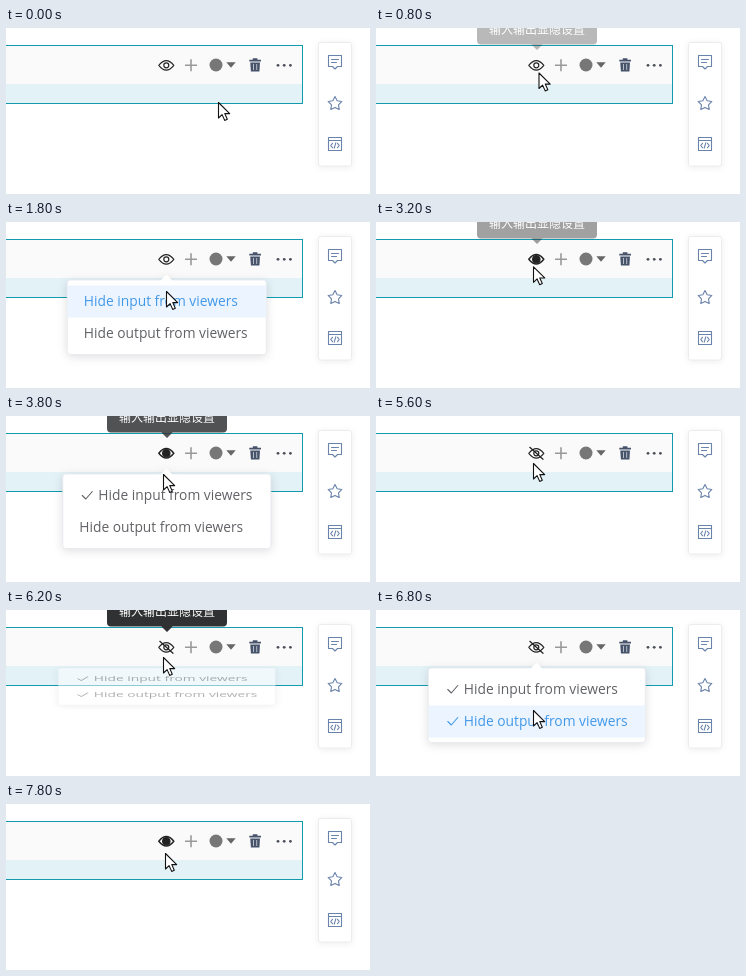
Recreate the animation shown at these times as an HTML page. Size 364 px wide and 166 px high, loop 8 s.

```html
<!DOCTYPE html>
<html lang="en">
<head>
<meta charset="utf-8">
<title>Cell visibility menu</title>
<style>
  html, body { margin: 0; width: 100%; height: 100%; overflow: hidden; background: #fff; }
  svg { display: block; width: 100%; height: 100%; }
  .line { fill: none; stroke-linecap: round; stroke-linejoin: round; }
  .panel { filter: drop-shadow(0 2px 5px rgba(0, 0, 0, .13)); }
  .side { filter: drop-shadow(0 1px 3px rgba(0, 0, 0, .07)); }
  .item { font: 13.8px "Open Sans", "Noto Sans", sans-serif; }
  .tip { font: 12px "Noto Sans CJK SC", "Noto Sans CJK", sans-serif; }
</style>
</head>
<body>
<svg viewBox="0 0 364 166" xmlns="http://www.w3.org/2000/svg">
  <rect width="364" height="166" fill="#fff"/>

  <g id="cell">
    <rect y="17" width="297" height="39" fill="#fafafa"/>
    <rect y="56" width="297" height="19" fill="#e3f2f7"/>
    <rect x="-2" y="17.5" width="298.5" height="58" fill="none" stroke="#149aae"/>
  </g>

  <g id="tools">
    <g class="line" stroke="#222" stroke-width="1.2">
      <path id="lid" d="M152.8 37.3Q160.3 27.8 167.8 37.3Q160.3 46.8 152.8 37.3Z"/>
      <circle id="pupil" cx="160.3" cy="37.3" r="2.5"/>
      <path id="slash" d="M153.8 31.3L167 43.3"/>
    </g>
    <path d="M179 37.2H191M185 31.2V43.2" stroke="#999" stroke-width="1.6"/>
    <circle cx="210" cy="37" r="6.5" fill="#777"/>
    <path d="M220.3 34.2H229.7L225 39.8Z" fill="#666"/>
    <g fill="#46536b">
      <path d="M246.8 30.3H251.4V31.8H255V33.6H243.3V31.8H246.8Z"/>
      <path d="M244.3 34.5H254L253.4 43.6H244.9Z"/>
      <path d="M247.5 36V42M250.7 36V42" stroke="#c5cad2" stroke-width=".9"/>
    </g>
    <g fill="#4b4f58">
      <circle cx="272" cy="37.3" r="1.4"/><circle cx="278.2" cy="37.3" r="1.4"/><circle cx="284.4" cy="37.3" r="1.4"/>
    </g>
  </g>

  <g id="sidebar">
    <rect class="side" x="312.5" y="14.5" width="33" height="123.5" rx="2" fill="#fff" stroke="#ececec"/>
    <g class="line" stroke="#6a83ab" stroke-width="1.1">
      <path d="M322.5 27.5H335.5V38.5H331.5L329 41L326.5 38.5H322.5ZM325.5 31.5H332.5M325.5 34.5H330.5"/>
      <path id="star"/>
      <path d="M322.5 109.5H335.5V122.5H322.5ZM322.5 112.5H335.5M326.5 115.3L324.7 117.5L326.5 119.7M331.5 115.3L333.3 117.5L331.5 119.7M329.8 114.8L328.2 120.2"/>
    </g>
  </g>

  <g id="tip">
    <path d="M101 -20H221V12.5Q221 16.5 217 16.5H166.5L161 22L155.5 16.5H105Q101 16.5 101 12.5Z" fill="#303133"/>
    <text class="tip" x="161" y="5.6" text-anchor="middle" fill="#fff">输入输出显隐设置</text>
  </g>

  <g id="menu">
    <g class="panel">
      <rect id="box" y="58" height="74.5" rx="3" fill="#fff" stroke="#e6e9ef" stroke-width=".8"/>
      <path d="M154.5 58.8L160.5 52.5L166.5 58.8Z" fill="#fff"/>
    </g>
    <rect id="hover" height="32" fill="#ecf5ff"/>
    <g class="row">
      <path class="line" d="M.5 79.5L4 83L10.5 75.5" stroke-width="1.1"/>
      <text class="item" y="84">Hide input from viewers</text>
    </g>
    <g class="row">
      <path class="line" d="M.5 111.5L4 115L10.5 107.5" stroke-width="1.1"/>
      <text class="item" y="116">Hide output from viewers</text>
    </g>
  </g>

  <path id="cursor" d="M.5 .5V16L4.1 12.6L6.7 18.4L9.3 17.2L6.8 11.6H11.7Z" fill="#fff" stroke="#111" stroke-width="1.1" stroke-linejoin="round"/>
</svg>

<script>
const LOOP = 8000, STEP = 200, FADE = 300;
const $ = id => document.getElementById(id);
const set = (el, attrs) => { for (const k in attrs) el.setAttribute(k, attrs[k]); };
const rows = [...document.querySelectorAll('.row')];

// time, x, y of the pointer tip
const path = [
  [0, 212, 74], [200, 197, 66], [400, 178, 53], [600, 164, 45], [1000, 161, 44], [1200, 161, 44],
  [1400, 160, 51], [1800, 160, 69], [2200, 159, 78], [2400, 159, 76], [3000, 157, 45], [3600, 157, 43],
  [3800, 157, 58], [4200, 157, 95], [4600, 157, 104], [4800, 157, 103], [5200, 157, 68], [5600, 157, 47],
  [6000, 157, 43], [6200, 157, 47], [6800, 157, 100], [7200, 157, 104], [7400, 157, 88], [7800, 159, 49],
  [8000, 159, 49]
];
const menuTimes = [[900, 2300], [3500, 4700], [6050, 7100]];
const tipTimes = [[700, 1300], [3065, 3750], [5700, 6200]];

const clamp = v => Math.max(0, Math.min(1, v));
const fade = (spans, t) => Math.max(...spans.map(([on, off]) =>
  Math.min(clamp((t - on) / FADE), clamp(1 - (t - off) / FADE))));

function pointer(t) {
  const i = path.findIndex(p => p[0] > t);
  const [t0, x0, y0] = path[i - 1], [t1, x1, y1] = path[i];
  const k = (t - t0) / (t1 - t0);
  return [x0 + (x1 - x0) * k, y0 + (y1 - y0) * k];
}

function drawEye(input, output) {
  const solid = input && !output;
  set($('lid'), { 'stroke-width': solid ? 1.5 : 1.2 });
  set($('pupil'), { r: solid ? 3.7 : 2.5, fill: solid ? '#222' : 'none' });
  set($('slash'), { visibility: output ? 'visible' : 'hidden' });
}

function drawMenu(shown, checks, y) {
  set($('menu'), {
    opacity: shown,
    transform: `translate(0 ${58 * (1 - shown)}) scale(1 ${shown})`,
    visibility: shown ? 'visible' : 'hidden'
  });
  const width = checks[1] ? 217 : checks[0] ? 208 : 199;
  const left = 160.8 - width / 2;
  const active = y < 64 || y > 128 ? -1 : y < 95 ? 0 : 1;
  set($('box'), { x: left, width });
  set($('hover'), { x: left + .4, width: width - .8, y: active ? 95.5 : 63.5, opacity: active < 0 ? 0 : 1 });
  rows.forEach((row, i) => {
    const color = i === active ? '#4298e8' : '#606266';
    const [check, text] = row.children;
    set(row, { transform: `translate(${left + 16.5} 0)` });
    set(check, { stroke: color, opacity: checks[i] ? 1 : 0, transform: 'translate(2.5 0)' });
    set(text, { fill: color, x: checks[i] ? 19 : 0 });
  });
}

function draw(time) {
  const t = Math.floor(time % LOOP / STEP) * STEP;
  const [x, y] = pointer(t);
  const checks = [t >= 2300, t >= 4700 && t < 7100];
  drawEye(...checks);
  drawMenu(fade(menuTimes, t), checks, y);
  set($('tip'), { opacity: fade(tipTimes, t) });
  set($('cursor'), { transform: `translate(${x} ${y})` });
}

const star = Array.from({ length: 10 }, (_, i) => {
  const a = i * Math.PI / 5, r = i % 2 ? 3.7 : 7.2;
  return `${329 + r * Math.sin(a)} ${75.7 - r * Math.cos(a)}`;
});
set($('star'), { d: `M${star.join('L')}Z` });

const start = performance.now();
(function tick() {
  draw(performance.now() - start);
  requestAnimationFrame(tick);
})();
</script>
</body>
</html>
```
